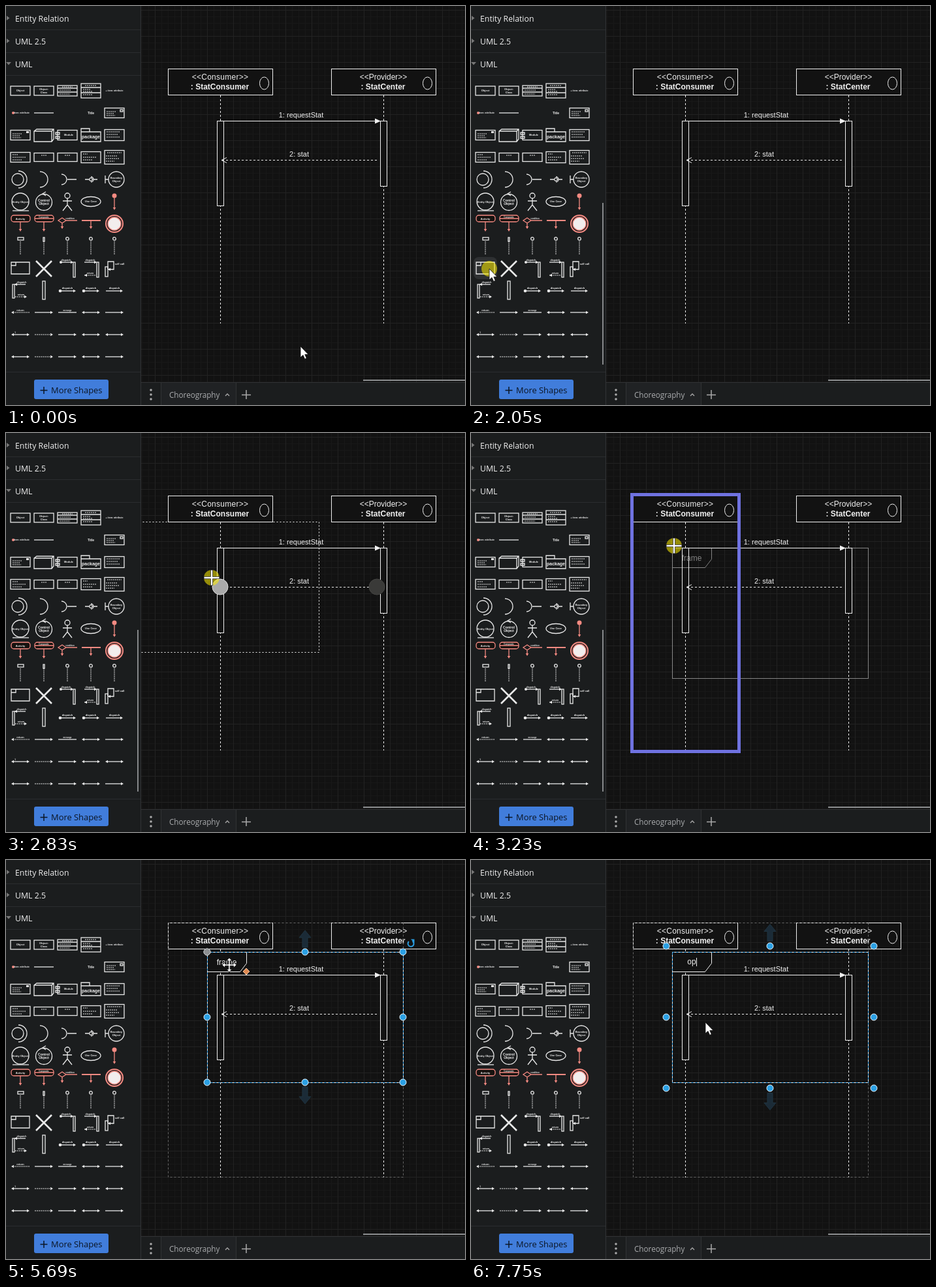
An HTML page for the animation above (8000 ms loop, 703 by 612 pixels).

```html
<!DOCTYPE html>
<html lang="en">
<head>
<meta charset="utf-8">
<title>Sequence diagram editor</title>
<style>
html, body { margin: 0; width: 100%; height: 100%; overflow: hidden; background: #121212; }
svg { display: block; width: 703px; height: 612px; }
text { font-family: "Liberation Sans", Arial, sans-serif; fill: #f0f0f0; }
.ui text { font-family: "Open Sans", "Noto Sans", sans-serif; }
.mid { text-anchor: middle; }
.line { fill: none; stroke: #f0f0f0; }
.box { fill: #121212; stroke: #f0f0f0; }
.icons { fill: none; stroke: #e8e8e8; stroke-width: 1.3; }
.icons text { stroke: none; font-weight: bold; text-anchor: middle; font-family: "Liberation Sans", sans-serif; }
.pink { stroke: #f58a82; }
.pinkFill { fill: #f58a82; stroke: none; }
.solid { fill: #e8e8e8; stroke: none; }
.dots { stroke-dasharray: 2 1; stroke-width: 1; }
.knob { fill: #2ba0e4; stroke: #e8f4fc; }
.arrow { fill: #1b2b37; stroke: #1f3441; }
</style>
</head>
<body>
<svg id="stage" viewBox="0 0 703 612"></svg>
<script>
const rect = (x, y, w, h, more = '') => `<rect x="${x}" y="${y}" width="${w}" height="${h}" ${more}/>`;
const path = (d, more = '') => `<path d="${d}" ${more}/>`;
const circle = (x, y, r, more = '') => `<circle cx="${x}" cy="${y}" r="${r}" ${more}/>`;
const text = (s, x, y, size, more = '') => `<text x="${x}" y="${y}" font-size="${size}" ${more}>${s}</text>`;
const group = (id, body, more = '') => `<g id="${id}" ${more}>${body}</g>`;

// Palette icons, drawn around the centre of their cell
const tiny = (s, x = 0, y = 1, size = 4) => text(s, x, y, size);
const dots = d => path(d, 'class="dots"');
const box = (h = 14) => rect(-15, -h / 2, 30, h);
const tip = (x, y, d) => path(`M${x} ${y}l${-4 * d}-2.3v4.6z`, 'class="solid"');
const down = y => path(`M0 ${y}l-2.3-4h4.6z`, 'class="pinkFill"');
const notes = dots('M-12-2H2M-12 1H-1M-12 4H1');
const arrowRight = (y = 0) => path(`M-14 ${y}H12`) + tip(14, y, 1);
const both = path('M-12 0H12') + tip(14, 0, 1) + tip(-14, 0, -1);
const dash = dots('M-14 0H12') + tip(14, 0, 1);
const dispatch = path('M-13 1H10') + tip(13, 1, 1) + tiny('dispatch', 0, -2);
const dot = circle(-11, 1, 2.3, 'class="solid"');
const life = dots('M0-7V13');
const lifeRing = circle(0, -11, 2.3) + life;
const pinkPill = rect(-14, -13, 29, 10, 'rx="4" class="pink" fill="#17120f"');

const icons = [
  [box(14) + tiny('Object'),
   box(14) + tiny('Object:', 0, -1, 4) + tiny('Class', 0, 4, 4),
   box(16) + path('M-15-4H15M-15 2H15') + dots('M-8-6H8M-12-1H6M-12 5H4'),
   box(22) + path('M-15-5H15M-15 3H15') + dots('M-9-8H9M-12-2H0M-12 1H2M-12 6H2'),
   tiny('+ item: attribute', 0, 1, 3.6)],
  [circle(-11, 0, 2, 'class="pinkFill"') + tiny('item: attribute', 2, 1, 3.6),
   path('M-15 0H15'), '', tiny('Title', 0, 2, 5),
   box(15) + notes + rect(9, -5, 4, 3)],
  [box(15) + notes + rect(9, -6, 4, 3, 'class="solid"'),
   path('M-15-6l4-3H15V6l-3 4H-15zM-15-6H12V10M12-6l3-3'),
   box(15) + path('M-18-4h6v3h-6zM-18 2h6v3h-6z') + tiny('Module', 2, 1, 4),
   path('M-15 10V-10H-2V-5H15V10zM-15-5H0') + tiny('package', 0, 5, 7),
   box(17) + dots('M-12-5H8M-12-1H5M-12 3H9')],
  [box(15) + dots('M-12-4H-4M-12 0H8M-12 4H2'),
   box(13) + dots('M-4-3H4'), box(13) + dots('M-4-3H4'),
   box(17) + dots('M-12-5H-5M-12 0H9M-12 4H3'),
   box(21) + dots('M-11-7H11M-13-2H5M-13 2H7M-13 6H0')],
  [circle(-4, 0, 9) + path('M-3-13A13 13 0 0 1-3 13'),
   path('M-6-12A12 12 0 0 1-6 12'),
   path('M-9-8A8 8 0 0 1-9 8M0 0H14'),
   path('M-9 0H-3M4 0H10M0-4A4 4 0 0 1 0 4') + circle(0, 0, 2.3),
   path('M-14-6V6M-14 0H-9') + circle(3, 0, 12) + tiny('Boundary', 3, -1) + tiny('Object', 3, 4)],
  [circle(0, 0, 13) + path('M-12 14H13') + tiny('Entity Object', 0, 2),
   circle(0, 1, 12.5) + path('M3-15l-5 3 5 3') + tiny('Control', 0, 0, 5) + tiny('Object', 0, 5, 5),
   circle(0, -9, 4) + path('M0-5V5M-7-1H7M0 5l-7 9M0 5l7 9'),
   '<ellipse rx="15" ry="7.5"/>' + tiny('Use Case'),
   circle(0, -9, 3.5, 'class="pinkFill"') + path('M0-6V9', 'class="pink"') + down(13)],
  [pinkPill + tiny('Activity', 0, -6.5) + path('M0-3V9', 'class="pink"') + down(12),
   pinkPill + path('M-14-8H15M0-3V9', 'class="pink"') + tiny('Composite', 0, -9, 3) + down(12),
   path('M-8-9l6 4-6 4-6-4zM-2-5H15M-8-1V7', 'class="pink"') + `<g transform="translate(-8 0)">${down(8)}</g>` + tiny('condition', 4, -7, 3),
   path('M-14-5H15', 'class="pink" stroke-width="2"') + path('M0-5V5', 'class="pink"') + down(8),
   circle(0, 0, 13, 'class="pink" stroke-width="2"') + circle(0, 0, 10, 'fill="#f2eded" class="pink"')],
  [rect(-4, -13, 9, 4) + life, rect(-1, -13, 2, 6) + life, lifeRing, lifeRing, lifeRing],
  [path('M-14-9H14V9H-14zM-14-4H-7V-9'),
   path('M-12-11L12 13M12-11L-12 13', 'stroke-width="2.6"'),
   path('M-10-9H8') + circle(-10, -9, 2, 'class="solid"') + tip(9, -9, 1) + tiny('dispatch', -2, -11, 3.6) + rect(9, -9, 3, 23),
   path('M-10-9H8') + tip(9, -9, 1) + tiny('dispatch', -1, -11, 3.6) + dots('M-10 11H8') + tip(-10, 11, -1) + tiny('return', -1, 9, 3.6) + rect(9, -9, 3, 23),
   rect(-14, -2, 4, 15) + path('M-10 2V-10H-1V2H-9') + tip(-10, 2, -1) + tiny('self call', 8, -5)],
  [rect(-12, -9, 3, 21) + path('M-9-9H8') + tip(-9, -9, -1) + tiny('dispatch', 2, -11, 3.6) + dots('M-8 10H8') + tip(10, 10, 1) + tiny('return', 1, 8, 3.6),
   rect(-2, -14, 4, 28), dispatch + dot, dispatch + dot, dispatch],
  [dots('M-12 0H14') + tip(-14, 0, -1) + tiny('return', 0, -2), arrowRight(), path('M-14 0H14') + tiny('message', 0, -2, 3), both, arrowRight()],
  [both + tiny('1', -8, -2, 3), dash, arrowRight(), both, both],
  [both, dash, arrowRight(), both, arrowRight()]
];
const palette = icons.map((row, r) => row.map((body, c) =>
  `<g transform="translate(${22 + 36 * c} ${130 + 34 * r})">${body}</g>`).join('')).join('');

// Main diagram
const header = (x, kind, name, spacing = 0) =>
  rect(x + .5, 96.5, 160, 40, 'class="box"') +
  text(`&lt;&lt;${kind}&gt;&gt;`, x + 80, 113, 12, `class="mid" letter-spacing="${spacing}"`) +
  text(': ' + name, x + 79.5, 128, 12, 'class="mid" font-weight="bold"') +
  `<ellipse cx="${x + 147.5}" cy="118.5" rx="7" ry="9.5" class="line"/>`;
const lifeline = (x, h) =>
  path(`M${x}.5 137V487`, 'class="line" stroke-dasharray="3 3"') + rect(x - 4.5, 176.5, 10, h, 'class="box"');
const diagram =
  header(248, 'Consumer', 'StatConsumer', .28) + header(498, 'Provider', 'StatCenter') +
  lifeline(328, 130) + lifeline(578, 100) +
  path('M334 176.5H566', 'class="line"') + path('M574 176.5l-9-4v8z', 'fill="#f0f0f0"') +
  text('1: requestStat', 452, 171, 11, 'class="mid"') +
  path('M568 236.5H331', 'class="line" stroke-dasharray="3 3"') + path('M338 232.5l-8 4 8 4', 'class="line"') +
  text('2: stat', 449, 231, 11, 'class="mid"');

const tab = (x, y, fill) => path(`M${x} ${y}h60v17l-10 13h-50z`, `fill="${fill}" stroke="#f0f0f0"`);
const frame = (x, y, fill) => rect(x, y, 300, 200, 'class="line"') + tab(x, y, fill);

const knobs = o => [308 - o, 458, 608 + o].map(x => [141 - o, 241, 341 + o].map(y =>
  x === 458 && y === 241 ? '' : circle(x, y, 5, 'class="knob"')).join('')).join('');
const hints = o =>
  path(`M458 ${108 - o}l9 11h-5v15h-8v-15h-5z`, 'class="arrow"') +
  path(`M458 ${374 + o}l9-11h-5v-15h-8v15h-5z`, 'class="arrow"');

const grid = (step, color) => {
  let d = '';
  for (let x = 228; x < 703; x += step) d += `M${x}.5 0V577`;
  if (step === 10) d += 'M208.5 0V577M218.5 0V577';
  for (let y = 6; y < 577; y += step) d += `M207 ${y}.5H703`;
  return path(d, `stroke="${color}"`);
};

const sidebar =
  rect(0, 0, 206, 612, 'fill="#1b1d1e"') + path('M206.5 0V612', 'stroke="#323436"') +
  path('M0 36.5H206M0 71.5H206M0 106.5H206M0 561.5H206', 'stroke="#2b2d2f"') +
  path('M1 15v7l4.5-3.500zM1 50v7l4.500-3.500zM0 86h8l-4 4.500z', 'fill="#777"') +
  text('Entity Relation', 14, 24, 12.3) + text('UML 2.5', 14, 59, 12.3) + text('UML', 14, 94, 12.3) +
  rect(0, 0, 36, 34, 'id="hover" rx="8" fill="#2e3032"') +
  `<g class="icons">${palette}</g>` +
  rect(201, 302, 2, 248, 'id="scroll" fill="#85878a"') +
  rect(43, 573, 114, 30, 'rx="3" fill="#417ddb"') +
  path('M52.500 589.500h11M58 584v11', 'stroke="#0b1524" stroke-width="1.500"') +
  text('More Shapes', 69, 594, 12.9, 'style="fill:#0b1524"');
const footer =
  rect(207, 577, 496, 35, 'fill="#1b1d1e"') + rect(237, 578, 115, 34, 'fill="#202224"') +
  path('M207 577.5H703M237.5 578V612M352.5 578V612', 'stroke="#303234"') +
  [589, 596, 603].map(y => circle(222, y, 1.8, 'fill="#aaa"')).join('') +
  text('Choreography', 250, 601, 11.7, 'style="fill:#a9abad"') +
  path('M336 598l3-3 3 3', 'fill="none" stroke="#aaa" stroke-width="1.300"') +
  path('M361 596.500h14M368 589v14', 'stroke="#aaa" stroke-width="1.500"');

const pointers =
  group('arrow', path('M0 0V17L4 13.500L6.700 19.500L9.300 18.300L6.800 12.500H12Z', 'fill="#fff" stroke="#111" stroke-width=".8"')) +
  group('cross', path('M-12 0H12M0-12V12', 'stroke="#222" stroke-width="4"') + path('M-11.500 0H11.500M0-11.500V11.500', 'stroke="#fff" stroke-width="2.400"')) +
  group('move', path('M0-11l4 4.500H1.200V-1.200H6.500V-4L11 0 6.500 4V1.200H1.200V6.500H4L0 11-4 6.500H-1.200V1.200H-6.500V4L-11 0-6.500-4V-1.200H-1.200V-6.500H-4z', 'fill="#fff" stroke="#111" stroke-width=".8"'));

document.getElementById('stage').innerHTML =
  '<clipPath id="view"><rect x="207" y="0" width="496" height="577"/></clipPath>' +
  rect(0, 0, 703, 612, 'fill="#121212"') + grid(10, '#181818') + grid(40, '#222') +
  diagram +
  group('group', rect(248.5, 96.5, 360, 390, 'class="line" style="stroke:#666" stroke-dasharray="3 3"')) +
  group('ghost', frame(.5, .5, 'none') + text('frame', 30, 20, 12, 'class="mid"'), 'opacity=".5" clip-path=""') +
  group('placed', frame(308.5, 141.5, '#121212') +
    rect(308.5, 141.5, 300, 200, 'fill="none" stroke="#1f9bea" stroke-dasharray="3 3"') +
    rect(322, 149, 32, 14, 'id="mark" fill="#0078d7"') +
    text('', 338, 161, 12, 'id="label" class="mid"') + path('', 'id="caret" class="line"')) +
  group('selected', hints(0) + knobs(0) + circle(308, 141, 5, 'fill="#8d8f91" stroke="#bbb"') +
    path('M368 166l5 5-5 5-5-5z', 'fill="#e08a52" stroke="#f3c3a2"') +
    path('M622.500 124.500A4.500 4.500 0 1 1 617 125', 'fill="none" stroke="#2ba0e4" stroke-width="2"') +
    path('M620 121.500h5.500v5.500z', 'fill="#2ba0e4"')) +
  group('editing', hints(9.5) + knobs(9)) +
  group('target', rect(246.5, 94.5, 164, 394, 'fill="none" stroke="#6f72e0" stroke-width="5"')) +
  group('ends', circle(328, 236, 12, 'fill="#a9a9a9" stroke="#ddd"') + circle(568, 236, 12, 'fill="#3a3a38" stroke="#454543"')) +
  rect(547, 573, 156, 2, 'fill="#8c8e90"') +
  `<g class="ui">${sidebar}${footer}</g>` +
  '<g id="clip">' + rect(.5, .5, 300, 200, 'id="outline" class="line" stroke-dasharray="2 3"') + '</g>' +
  group('pointer', circle(0, 0, 12, 'id="press" fill="#ffef00" opacity=".55"') + pointers);

const el = id => document.getElementById(id);
const show = (id, on) => el(id).style.display = on ? '' : 'none';
const place = (id, x, y) => el(id).setAttribute('transform', `translate(${x} ${y})`);
const within = (t, a, b) => t >= a && t < b;
const snap = (v, base) => Math.round((v - base) / 10) * 10 + base;

// Pointer path: time, x, y
const route = [
  [0, 451, 522], [540, 451, 522], [700, 380, 501], [900, 205, 462], [1070, 87, 438],
  [1340, 36, 411], [1480, 28, 403], [2110, 28, 403], [2250, 90, 402], [2450, 250, 404],
  [2560, 335, 404], [2700, 322, 280], [2830, 315, 222], [2900, 315, 222], [3150, 311, 180],
  [3530, 309, 148], [4130, 309, 148], [4190, 309, 147], [4270, 309, 145], [4990, 309, 145],
  [5250, 325, 152], [5600, 342, 161], [6400, 342, 161], [6730, 359, 249], [8000, 359, 249]
];
function pointerAt(t) {
  const i = route.findIndex(p => p[0] > t);
  const [a, b] = [route[i - 1], route[i]];
  const k = (t - a[0]) / (b[0] - a[0]);
  return [a[1] + (b[1] - a[1]) * k, a[2] + (b[2] - a[2]) * k];
}

function draw(t) {
  const [x, y] = pointerAt(t).map(Math.round);
  const dragging = within(t, 2110, 4770);
  const inSide = x < 206;
  const onEdge = within(t, 2730, 2960);
  const dropped = t >= 4770;
  const edit = t >= 6170;

  show('scroll', within(t, 900, 4990));
  const col = Math.floor((x - 4) / 36), row = Math.floor((y - 113) / 34);
  show('hover', inSide && t > 540 && t < 2200 && col < 5 && row < 13);
  place('hover', 4 + 36 * col, 113 + 34 * row);

  show('outline', dragging && (inSide || onEdge));
  if (onEdge) place('outline', 179, 136); else place('outline', x, y);
  el('clip').setAttribute('clip-path', onEdge ? 'url(#view)' : 'none');
  show('ends', onEdge);
  show('ghost', dragging && !inSide && !onEdge);
  place('ghost', snap(x, 8), t >= 4270 ? 141 : snap(y, 6));
  show('target', dragging && x > 248 && !onEdge);

  show('group', dropped);
  show('placed', dropped);
  show('selected', dropped && !edit);
  show('editing', edit);
  show('mark', within(t, 6170, 7630));
  const typed = t >= 7630;
  el('label').textContent = t >= 7750 ? 'op' : typed ? 'o' : 'frame';
  el('label').setAttribute('y', typed ? 160 : 161);
  show('caret', typed);
  el('caret').setAttribute('d', `M${t >= 7750 ? 345.5 : 342.5} 150V163`);

  place('pointer', x, y);
  show('press', within(t, 2050, 4420) || within(t, 5990, 6050) || within(t, 6110, 6170));
  const cross = dragging && !inSide && t < 3990;
  const move = within(t, 5250, 6460);
  show('cross', cross);
  show('move', move);
  show('arrow', !cross && !move);
}

function tick() {
  draw(performance.now() % 8000);
  requestAnimationFrame(tick);
}
tick();
</script>
</body>
</html>
```
